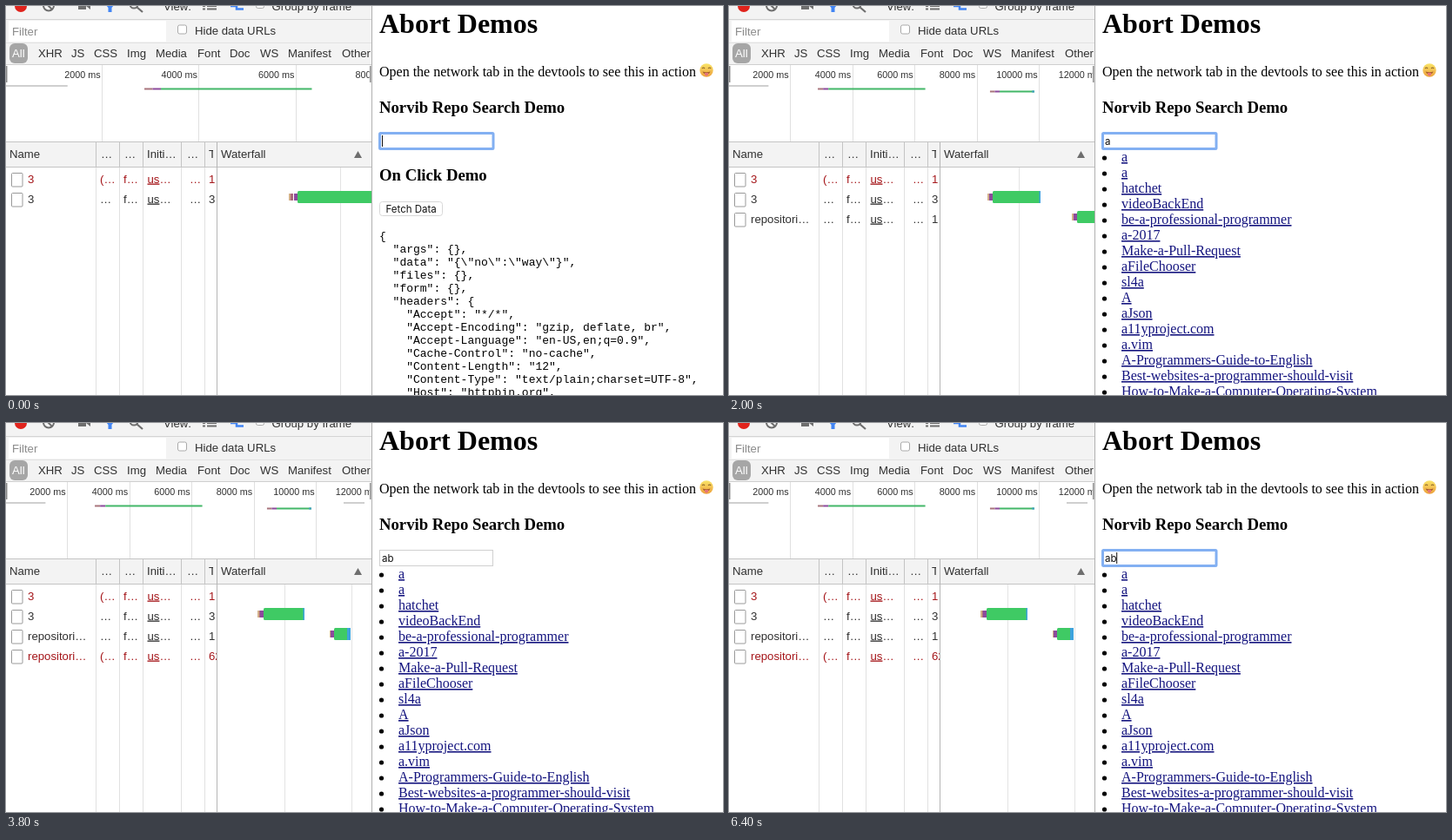
These frames come from a looping animation (824x448 px, 6500 ms). An HTML page:

```html
<!DOCTYPE html>
<html lang="en">
<head>
<meta charset="utf-8">
<title>Abort Demos</title>
<style>
  html, body { margin: 0; width: 100%; height: 100%; overflow: hidden; background: #fff; }
  svg { display: block; width: 824px; height: 448px; }
  text { white-space: pre; }
  .ui { font: 13.2px "Liberation Sans", Arial, sans-serif; fill: #303030; }
  .tick { font: 10.8px "Liberation Sans", Arial, sans-serif; fill: #303030; }
  .ctl { font: 11.5px Inter, sans-serif; fill: #111; }
  .page { font: 16px "Liberation Serif", Times, serif; }
  .h1 { font: bold 32px "Liberation Serif", Times, serif; }
  .h3 { font: bold 18.72px "Liberation Serif", Times, serif; }
  .code { font: 13px "Liberation Mono", Courier, monospace; }
  .link { fill: #14147f; text-decoration: underline; }
</style>
</head>
<body>
<svg viewBox="0 0 824 448" xmlns="http://www.w3.org/2000/svg">
  <defs>
    <clipPath id="panel"><rect width="420" height="448"/></clipPath>
    <clipPath id="ruler"><rect width="417.5" height="160"/></clipPath>
    <clipPath id="timeHead"><rect x="229" y="157" width="9" height="28"/></clipPath>
    <clipPath id="timeCol"><rect x="229" y="186" width="13" height="262"/></clipPath>
    <linearGradient id="face" x2="0" y2="1"><stop stop-color="#f9e468"/><stop offset="1" stop-color="#eda03c"/></linearGradient>
    <linearGradient id="press" x2="0" y2="1"><stop stop-color="#70a8f6"/><stop offset="1" stop-color="#3a6fe6"/></linearGradient>
    <filter id="shade" x="-20%" y="-40%" width="140%" height="200%"><feDropShadow dx="0" dy="1" stdDeviation="1.5" flood-opacity=".25"/></filter>
  </defs>
  <g id="stage"></g>
</svg>
<script>
const LOOP = 6500;
// Moments (ms) at which the interface changes.
const AT = { typeA: 400, resultsA: 1800, typeB: 2900, press: 3300, cancel: 3500,
             hover: 4000, tip: 4400, tipEnd: 5000, hoverEnd: 5100, refocus: 6000 };
const RED = '#a5161a', GREY = '#858585', GREEN = '#3fca64';

const REPOS = ['a', 'a', 'hatchet', 'videoBackEnd', 'be-a-professional-programmer', 'a-2017',
  'Make-a-Pull-Request', 'aFileChooser', 'sl4a', 'A', 'aJson', 'a11yproject.com', 'a.vim',
  'A-Programmers-Guide-to-English', 'Best-websites-a-programmer-should-visit',
  'How-to-Make-a-Computer-Operating-System'];

const RESPONSE = [
  '{', '  "args": {},', '  "data": "{\\"no\\":\\"way\\"}",', '  "files": {},', '  "form": {},',
  '  "headers": {', '    "Accept": "*/*",', '    "Accept-Encoding": "gzip, deflate, br",',
  '    "Accept-Language": "en-US,en;q=0.9",', '    "Cache-Control": "no-cache",',
  '    "Content-Length": "12",', '    "Content-Type": "text/plain;charset=UTF-8",',
  '    "Host": "httpbin.org",'];

// Waterfall layout per stage: grid lines and [start, download, end] of each bar.
const STAGES = [
  { from: 0,           perMs: .0557,  grid: [384.5],        bars: [[325, 335, 440]] },
  { from: AT.typeA,    perMs: .0447,  grid: [349.5],        bars: [[305, 313, 377]] },
  { from: AT.resultsA, perMs: .03575, grid: [333.5],        bars: [[297, 303, 358], [394, 400, 424]] },
  { from: AT.typeB,    perMs: .03575, grid: [324.5, 406.5], bars: [[291, 298, 349], [379, 385, 404]] },
  { from: AT.cancel,   perMs: .03575, grid: [320.5, 397.5], bars: [[289, 296, 343], [372, 377, 396]] }];

const text = (x, y, s, cls = 'ui', extra = '') => `<text x="${x}" y="${y}" class="${cls}" ${extra}>${s}</text>`;
const rect = (x, y, w, h, fill, extra = '') => `<rect x="${x}" y="${y}" width="${w}" height="${h}" fill="${fill}" ${extra}/>`;
const path = (d, stroke, width = 1, fill = 'none') => `<path d="${d}" stroke="${stroke}" stroke-width="${width}" fill="${fill}"/>`;
const vline = (x, y1, y2, color) => path(`M${x} ${y1}V${y2}`, color);
const hline = (y, color) => path(`M0 ${y}H420`, color);
const circle = (x, y, r, fill, extra = '') => `<circle cx="${x}" cy="${y}" r="${r}" fill="${fill}" ${extra}/>`;
const box = (x, y, s) => rect(x, y, s, s, '#fff', 'rx="2" stroke="#aaa"');
const clip = (id, body) => `<g clip-path="url(#${id})">${body}</g>`;

function toolbar() {
  const filters = [['XHR', 37], ['JS', 75], ['CSS', 101], ['Img', 139], ['Media', 172], ['Font', 220],
    ['Doc', 257], ['WS', 292], ['Manifest', 324], ['Other', 386]];
  return rect(0, 0, 420, 68, '#f3f3f3') + hline(15.5, '#d4d4d4') +
    circle(17, 0, 7, '#e0231c') +
    circle(49, -.5, 6, 'none', 'stroke="#6e6e6e" stroke-width="2"') + path('M45 -4L53 4', '#6e6e6e', 2) +
    rect(83, -4, 9, 8, '#6e6e6e') + path('M92 0L97 -3V4Z', 'none', 0, '#6e6e6e') +
    path('M115 -1H124L121.5 2V7H117.5V2Z', 'none', 0, '#4285f4') +
    circle(147, -2, 4.5, 'none', 'stroke="#6e6e6e" stroke-width="2"') + path('M150 1L157 7', '#6e6e6e', 2.2) +
    text(181, 4.5, 'View:') + path('M226 0H229M231 0H242M226 3.5H229M231 3.5H242', '#6e6e6e', 2) +
    path('M258 0H265V3.5H273', '#4285f4', 2.5) + box(287.5, -6.5, 9) + text(305.5, 4.5, 'Group by frame') +
    rect(3, 17, 181, 24, '#fff') + text(7, 34, 'Filter', 'ui', 'style="fill:#8b8b8b"') +
    box(197.5, 22, 10) + text(217, 33, 'Hide data URLs') + hline(42.5, '#e2e2e2') +
    rect(4, 43, 21, 23, '#a6a6a6', 'rx="6"') + text(7, 59, 'All', 'ui', 'style="fill:#fff"') +
    filters.map(([s, x]) => text(x, 59, s)).join('') + hline(67.5, '#cfcfcf');
}

function overview(stage, t) {
  const k = stage.perMs;
  const strip = (y, start, wait, end) => {
    const half = (wait - start) * k / 2;
    return rect(start * k, y, half, 2, '#a8747c') + rect(start * k + half, y, half, 2, '#8c4a9c') +
      rect(wait * k, y, (end - wait) * k, 2, '#43b768');
  };
  let out = rect(0, 68, 420, 88, '#fff');
  for (let i = 1; i < 7; i++) {
    const x = 2000 * i * k;
    out += vline(Math.floor(x) - .5, 68, 156, '#e0e0e0') + text(x - 2.8, 83, `${2000 * i} ms`, 'tick', 'text-anchor="end"');
  }
  out += rect(0, 91, 1270 * k, 2, '#cfcfcf') + strip(94.5, 2855, 3196, 6310);
  if (t >= AT.resultsA) out += strip(97.5, 8390, 8700, 9818) + rect(9740 * k, 97.5, 78 * k, 2, '#3e9fc0');
  if (t >= AT.cancel) out += rect(10853 * k, 91, 24, 2, '#cfcfcf');
  return clip('ruler', out) + rect(0, 69, 1.5, 19, '#8b8b8b') + rect(418, 69, 1.5, 19, '#8b8b8b');
}

function requestRow(i, name, status, time, color, statusColor = color) {
  const y = 203.5 + 23 * i, tint = c => `style="fill:${c}"`;
  return rect(6.5, 192.5 + 23 * i, 12.5, 15.5, '#fff', 'rx="1" stroke="#999"') +
    text(25, y, name, 'ui', tint(color)) + text(108, y, status, 'ui', tint(statusColor)) +
    text(135, y, 'f…', 'ui', tint(color)) +
    text(162.5, y, '<tspan text-decoration="underline">us</tspan>…', 'ui', tint(color)) +
    text(211, y, '…', 'ui', tint(color)) +
    clip('timeCol', text(233, y, time, 'ui', tint(statusColor)));
}

function waterfallBar([start, download, end], i, finished) {
  const y = 213 + 23 * i;
  return rect(start, y + 3, 3, 8, '#d3b08a') + rect(start + 2, y + 3, 3, 8, '#a9677c') +
    rect(download - 4, y + 3, 4, 8, '#8c4a9c') +
    rect(download, y, end - download, 14, GREEN, 'rx="1.5"') +
    (finished ? rect(end - (i ? 4 : 1.5), y, i ? 4 : 1.5, 14, '#3ea3dc') : '');
}

function table(stage, t) {
  const heads = [['Name', 4], ['…', 109], ['…', 136], ['Initi…', 162], ['…', 208], ['Waterfall', 247]];
  const canceled = t >= AT.cancel, done = t >= AT.resultsA, dark = '#303030';
  let out = rect(0, 156, 420, 30, '#f3f3f3') + hline(156.5, '#c4c4c4') + hline(185.5, '#c4c4c4');
  if (t >= AT.hover && t < AT.hoverEnd) out += rect(0, 256, 420, 23, '#f3f8fe');
  out += [103.5, 130.5, 157.5, 201.5, 228.5].map(x => vline(x, 157, 185, '#c4c4c4') + vline(x, 186, 448, '#e1e1e1')).join('');
  out += stage.grid.map(x => vline(x, 186, 448, '#e3e3e3')).join('') + vline(242.5, 157, 448, '#b5b5b5');
  out += heads.map(([s, x]) => text(x, 175, s)).join('') + clip('timeHead', text(233, 175, 'T'));
  out += path('M400 175L404.5 167L409 175Z', 'none', 0, '#6e6e6e');
  out += requestRow(0, '3', '(…', '1', RED) + requestRow(1, '3', '…', '3', dark);
  if (t >= AT.typeA) out += requestRow(2, 'repositori…', done ? '…' : '(…', done ? '1' : 'P', dark, done ? dark : GREY);
  if (t >= AT.typeB) out += requestRow(3, 'repositori…', '(…', canceled ? '62' : 'P', canceled ? RED : dark, canceled ? RED : GREY);
  out += stage.bars.map((b, i) => waterfallBar(b, i, t >= AT.typeA)).join('');
  if (t >= AT.tip && t < AT.tipEnd)
    out += rect(138.5, 289.5, 79, 26, '#f5f5f5', 'rx="2" stroke="#c8c8c8" filter="url(#shade)"') + text(147, 307, '(canceled)');
  return out;
}

function button(x, y, w, label, pressed) {
  return rect(x + .5, y + .5, w - 1, 16, pressed ? 'url(#press)' : '#fff', `rx="3" stroke="${pressed ? '#3f73dc' : '#d8d8d8'}"`) +
    text(x + 7.5, y + 13, label, 'ctl');
}

function searchInput(t) {
  const value = t < AT.typeA ? '' : t < AT.typeB ? 'a' : 'ab';
  const focused = t < AT.press || t >= AT.refocus;
  const since = t < AT.typeA ? t : t < AT.typeB ? t - AT.typeA : t < AT.refocus ? t - AT.typeB : t - AT.refocus;
  let out = focused
    ? rect(429.5, 146.5, 130.5, 18, '#fff', 'rx="1" stroke="#83b0f2" stroke-width="3"')
    : rect(429.5, 146.5, 130, 18, '#fff', 'stroke="#d0d0d0"');
  out += text(432, 160, value, 'ctl');
  if (focused && since % 1000 < 500) out += vline(432.5 + value.length * 6.6, 149, 162, '#111');
  return out;
}

function emoji() {
  return circle(805, 74, 7.7, 'url(#face)') +
    path('M800 72Q801.5 70 803 72M807 72Q808.5 70 810 72', '#8a6428', 1.2) +
    path('M800.5 75.5Q805 77 809.5 75.5Q808.5 78.5 805 78.5T800.5 75.5Z', 'none', 0, '#a8602c') +
    path('M803 77H807V79Q805 82 803 79Z', 'none', 0, '#e57478');
}

function page(t) {
  const loading = (t >= AT.typeA && t < AT.resultsA) || (t >= AT.typeB && t < AT.cancel);
  let out = text(429, 31, 'Abort Demos', 'h1') +
    text(429, 81, 'Open the network tab in the devtools to see this in action', 'page') + emoji() +
    text(429, 123, 'Norvib Repo Search Demo', 'h3') + searchInput(t);
  if (t >= AT.typeA && !loading)
    return out + REPOS.map((name, i) => circle(431.5, 175 + 18 * i, 2.6, '#000') +
      text(451, 179 + 18 * i, name, 'page link')).join('');
  const shift = loading ? 18 : 0;
  if (loading) out += text(429, 179, 'Loading...', 'page') +
    button(495, 165.5, 97, 'Cancel Request', t >= AT.press);
  return out + text(429, 201 + shift, 'On Click Demo', 'h3') + button(429, 225 + shift, 73, 'Fetch Data') +
    RESPONSE.map((line, i) => text(429, 269 + shift + 15 * i, line, 'code')).join('');
}

const stageNode = document.getElementById('stage');
let shown = '';

function render(t) {
  const stage = STAGES.filter(s => t >= s.from).pop();
  const markup = clip('panel', toolbar() + overview(stage, t) + table(stage, t)) +
    vline(420.5, 0, 448, '#b0b0b0') + page(t);
  if (markup !== shown) stageNode.innerHTML = shown = markup;
}

const startTime = performance.now();
function tick() {
  render((performance.now() - startTime) % LOOP);
  requestAnimationFrame(tick);
}
tick();
</script>
</body>
</html>
```
